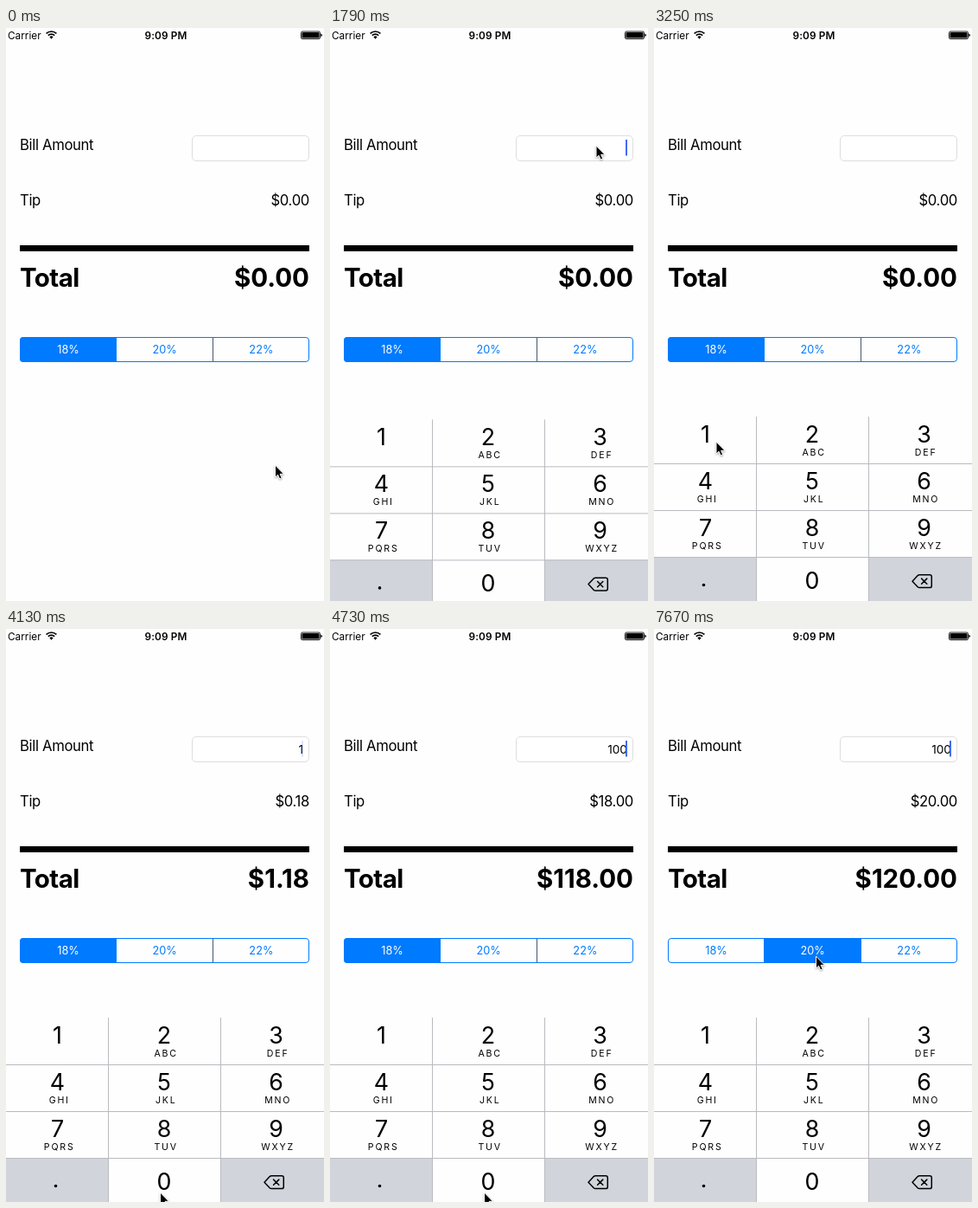
An HTML page that plays this animation: 368 px wide and 662 px high, repeating every 8000 ms.

```html
<!DOCTYPE html>
<html lang="en">
<head>
<meta charset="utf-8">
<title>Tip calculator</title>
<style>
  html, body { margin: 0; width: 100%; height: 100%; overflow: hidden; background: #fefefe; }
  svg { display: block; width: 368px; height: 662px; }
  text { font-family: Inter, Roboto, sans-serif; font-optical-sizing: none; white-space: pre; }
  .status { font-size: 11.8px; }
  .body { font-size: 16.7px; letter-spacing: -.35px; }
  .big { font-size: 29.5px; font-weight: 700; }
  .field { font-size: 13.7px; }
  .seg { font-size: 12.75px; }
  .digit { font-size: 26.8px; }
  .letters { font-size: 10.6px; letter-spacing: 1.8px; }
  .end { text-anchor: end; }
  .mid { text-anchor: middle; }
  #pointer { filter: drop-shadow(0 1px 1px rgba(0, 0, 0, .35)); }
</style>
</head>
<body>
<svg viewBox="0 0 368 662">
  <rect width="368" height="662" fill="#fefefe"/>

  <text class="status" x="2" y="12.5">Carrier</text>
  <g fill="none" stroke="#000" stroke-width="1.7">
    <path d="M46.6 6.4a8.4 8.4 0 0 1 11.8 0"/>
    <path d="M48.8 8.7a5.2 5.2 0 0 1 7.4 0"/>
  </g>
  <path d="M50.4 10.3a3 3 0 0 1 4.2 0L52.5 12.7z"/>
  <text class="status mid" x="185" y="12.5" font-weight="600" letter-spacing=".1">9:09 PM</text>
  <rect x="341.5" y="4" width="22" height="8.6" rx="1.6" fill="none" stroke="#000" stroke-width=".9"/>
  <rect x="342.5" y="5" width="20" height="6.6" rx=".7"/>
  <path d="M364.4 6.6q1.6 .4 1.6 1.7t-1.6 1.7z"/>

  <text class="body" x="16" y="140.7">Bill Amount</text>
  <rect x="215.5" y="124.5" width="135" height="29" rx="4.5" fill="#fff" stroke="#dedede"/>
  <text class="field end" id="amount" x="344" y="143.8"></text>
  <rect id="caret" x="342" y="129" width="2" height="18.5" fill="#426bf2"/>

  <text class="body" x="16" y="204.7">Tip</text>
  <text class="body end" id="tip" x="351" y="204.7"></text>
  <rect x="16" y="251" width="335" height="7"/>
  <text class="big" x="16" y="299" letter-spacing="-.6">Total</text>
  <text class="big end" id="total" x="351" y="298.5"></text>

  <g id="segments">
    <rect x="16.5" y="357.5" width="334" height="28" rx="3.5" fill="#fefefe" stroke="#007aff"/>
    <path d="M127.5 358v27" stroke="#007aff"/>
    <path d="M239.5 358v27" stroke="#45566b"/>
    <path id="tint" fill="#007aff"/>
  </g>

  <g id="keyboard"></g>

  <path id="pointer" d="M0 0V14L3.1 11.2 5.2 16 7.7 14.9 5.6 10.3H10Z"
        fill="#000" stroke="#fff" stroke-width="1"/>
</svg>

<script>
const LOOP = 8000, TICK = 147.4;
const RATES = [18, 20, 22];
const COLS = [0, 118, 248, 368];
const ROWS = [449, 503, 557, 611, 662];
const KB_HEIGHT = 213, KB_START = 1438;
const GRAY = '#d1d5db';

const MOVES = [ // start, end, x, y
  [60, 600, 306, 194],
  [800, 1190, 308, 136],
  [2300, 3250, 72, 478],
  [3780, 4130, 178.5, 651],
  [6100, 6494, 193, 433],
  [6494, 7080, 187.5, 378]
];
const PRESSES = [ // key, down, up
  ['1', 3370, 3520], ['0', 4270, 4420], ['0', 4560, 4710]
];
const BLINKS = [1524, 3587, 4420, 4710];
const TAP = { down: 7210, up: 7360 };

const $ = id => document.getElementById(id);
const clamp = v => Math.min(1, Math.max(0, v));
const ease = p => p * p * (3 - 2 * p);

function add(parent, tag, attrs, text = '') {
  const el = document.createElementNS('http://www.w3.org/2000/svg', tag);
  for (const k in attrs) el.setAttribute(k, attrs[k]);
  el.textContent = text;
  return parent.appendChild(el);
}

const segLabels = RATES.map((rate, i) =>
  add($('segments'), 'text', { class: 'seg mid', x: 72 + i * 111.7, y: 376 }, rate + '%'));

const keys = {};
function buildKeyboard() {
  const kb = $('keyboard');
  const labels = ['1', '2', '3', '4', '5', '6', '7', '8', '9', '.', '0', 'del'];
  const letters = ['', 'ABC', 'DEF', 'GHI', 'JKL', 'MNO', 'PQRS', 'TUV', 'WXYZ'];
  const centers = [59.5, 183, 312.5];
  labels.forEach((label, i) => {
    const c = i % 3, r = Math.floor(i / 3), x = centers[c];
    const fill = label === '.' || label === 'del' ? GRAY : '#fefefe';
    keys[label] = add(kb, 'rect', {
      x: COLS[c], y: ROWS[r], width: COLS[c + 1] - COLS[c], height: ROWS[r + 1] - ROWS[r], fill
    });
    if (label === '.') add(kb, 'circle', { cx: 57.5, cy: 643.5, r: 1.8 });
    else if (label !== 'del')
      add(kb, 'text', { class: 'digit mid', x, y: r === 3 ? 648 : ROWS[r] + 30 }, label);
    if (letters[i])
      add(kb, 'text', { class: 'letters mid', x: x + 2.2, y: ROWS[r] + 45 }, letters[i]);
  });
  const line = d => add(kb, 'path', { d, stroke: '#b9bbc0', 'stroke-width': 1 });
  [118.5, 248.5].forEach(x => line(`M${x} 449V662`));
  [503.5, 557.5, 611.5].forEach(y => line(`M0 ${y}H368`));
  add(kb, 'path', {
    d: 'M299 639.2L305.2 632.6Q306 631.8 307.2 631.8H319Q321.3 631.8 321.3 634V644.4' +
       'Q321.3 646.6 319 646.6H307.2Q306 646.6 305.2 645.8ZM309.6 636.1l6.2 6.2m0-6.2l-6.2 6.2',
    fill: 'none', stroke: '#000', 'stroke-width': 1.5, 'stroke-linejoin': 'round', 'stroke-linecap': 'round'
  });
}

function pointerAt(t) {
  let x = 311.5, y = 505;
  for (const [start, end, tx, ty] of MOVES) {
    const p = ease(clamp((t - start) / (end - start)));
    x += (tx - x) * p;
    y += (ty - y) * p;
  }
  return [x, y];
}

function caretOpacity(t) {
  if (t < KB_START) return 0;
  const start = BLINKS.filter(b => b <= t).pop() ?? t;
  if (t - start < 420) return 1;
  const k = (t - start - 420) % 900;
  return k < 460 ? clamp(1 - k / 160) : clamp((k - 460) / 160);
}

// Critically damped spring
function keyboardOffset(t) {
  const w = Math.max(0, t - KB_START) * .018;
  return KB_HEIGHT * (1 + w) * Math.exp(-w);
}

function drawSegments(t) {
  const selected = t >= TAP.up ? 1 : 0;
  const pressing = t >= TAP.down && t < TAP.up;
  const first = 'M128 357H20a4 4 0 0 0-4 4V382a4 4 0 0 0 4 4H128Z';
  const second = 'M127 357H240V386H127Z';
  $('tint').setAttribute('d', selected ? second : first);
  segLabels.forEach((el, i) => {
    el.setAttribute('fill', i === selected ? '#fff' : '#007aff');
    el.setAttribute('opacity', pressing && i === 1 ? .7 : 1);
  });
  return RATES[selected] / 100;
}

function draw(t) {
  const amount = PRESSES.filter(p => t >= p[2]).map(p => p[0]).join('');
  const tip = amount * drawSegments(t);
  $('amount').textContent = amount;
  $('tip').textContent = '$' + tip.toFixed(2);
  $('total').textContent = '$' + (+amount + tip).toFixed(2);
  $('caret').setAttribute('opacity', caretOpacity(t));

  $('keyboard').setAttribute('transform', `translate(0 ${keyboardOffset(t).toFixed(1)})`);
  for (const key of ['0', '1']) {
    const down = PRESSES.some(p => p[0] === key && t >= p[1] && t < p[2]);
    keys[key].setAttribute('fill', down ? GRAY : '#fefefe');
  }
  $('pointer').setAttribute('transform', `translate(${pointerAt(t)})`);
}

buildKeyboard();
const begin = performance.now();
function frame() {
  const t = (performance.now() - begin) % LOOP;
  draw(Math.floor((t + 5) / TICK) * TICK + 8);
  requestAnimationFrame(frame);
}
frame();
</script>
</body>
</html>
```
